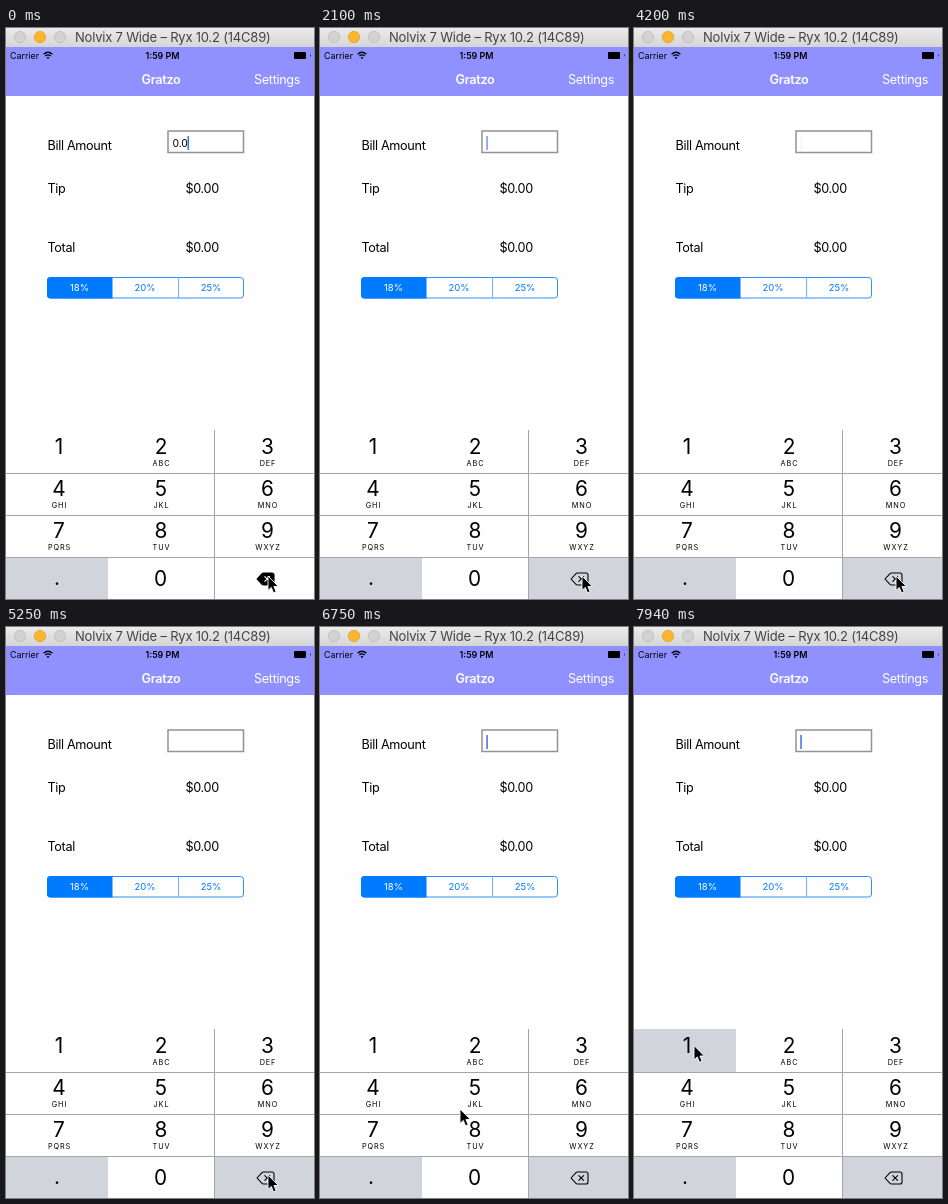
An HTML page for the animation above (8000 ms loop, 308 px wide and 571 px high).

```html
<!DOCTYPE html>
<html lang="en">
<head>
<meta charset="utf-8">
<title>Tip calculator</title>
<style>
  html, body { margin: 0; width: 100%; height: 100%; overflow: hidden; background: #fff; }
  svg { display: block; width: 308px; height: 571px; }
  text { font-family: Inter, Roboto, sans-serif; font-size: 12.65px; letter-spacing: -.32px; fill: #000; }
  .mid { text-anchor: middle; }
  .bar { font-size: 13px; letter-spacing: -.2px; fill: #444; }
  .status { font-size: 8.9px; letter-spacing: 0; }
  .nav { fill: #fff; }
  .bold { font-weight: 600; }
  .field { font-size: 10.4px; letter-spacing: -.1px; }
  .seg { font-size: 9.5px; letter-spacing: -.1px; fill: #007aff; }
  .digit { font-size: 20.8px; letter-spacing: 0; }
  .letters { font-size: 7.3px; letter-spacing: .9px; }
  .line { stroke: #a4a6aa; fill: none; }
  .grey { fill: #d1d5db; }
</style>
</head>
<body>
<svg viewBox="0 0 308 571">
  <defs>
    <linearGradient id="chrome" x2="0" y2="1">
      <stop stop-color="#ebebeb"/><stop offset="1" stop-color="#d5d5d5"/>
    </linearGradient>
  </defs>
  <rect width="308" height="571" fill="#fefefe"/>

  <rect width="308" height="19" fill="url(#chrome)"/>
  <g stroke-width=".7">
    <circle cx="14" cy="9" r="5.7" fill="#d2d2d2" stroke="#b9b9b9"/>
    <circle cx="34" cy="9" r="5.7" fill="#fdb52d" stroke="#dd9d26"/>
    <circle cx="54" cy="9" r="5.7" fill="#d2d2d2" stroke="#b9b9b9"/>
  </g>
  <text class="bar" x="69" y="14">Nolvix 7 Wide – Ryx 10.2 (14C89)</text>

  <rect y="19" width="308" height="49" fill="#9090ff"/>
  <text class="status" x="4" y="31">Carrier</text>
  <g fill="none" stroke="#000" stroke-width="1.3">
    <path d="M37.6 26.2Q42 22.2 46.4 26.2M39.3 28.1Q42 25.7 44.7 28.1"/>
    <path d="M42 31.2L40.6 29.6Q42 28.6 43.4 29.6Z" fill="#000" stroke="none"/>
  </g>
  <text class="status bold mid" x="156.5" y="31">1:59 PM</text>
  <rect x="288" y="24" width="12" height="7" rx="1"/>
  <path d="M304 26q1.6 1.5 0 3z"/>
  <text class="nav bold mid" x="155" y="56">Gratzo</text>
  <text class="nav" x="248" y="56">Settings</text>

  <text x="41.5" y="122">Bill Amount</text>
  <text x="41.5" y="165">Tip</text>
  <text x="41.5" y="224">Total</text>
  <text x="179.5" y="165">$0.00</text>
  <text x="179.5" y="224">$0.00</text>

  <rect x="162" y="103" width="75.5" height="21.5" fill="#fff" stroke="#939393" stroke-width="1.5"/>
  <text class="field" id="amount" x="166.5" y="118.5"></text>
  <rect id="caret" y="108" width="1.5" height="14" fill="#426bf2"/>

  <rect x="41.5" y="249.5" width="196" height="20.5" rx="3" fill="#fff" stroke="#2f8fff"/>
  <path d="M106.5 249H44.5a3.5 3.5 0 0 0-3.5 3.5v14.5a3.5 3.5 0 0 0 3.5 3.5H106.5z" fill="#007aff"/>
  <path d="M172.5 249.5V270" stroke="#6fb3ff"/>
  <text class="seg mid" x="73.5" y="263" style="fill:#fff">18%</text>
  <text class="seg mid" x="139" y="263">20%</text>
  <text class="seg mid" x="205" y="263">25%</text>

  <rect class="grey" id="one" y="402" width="102" height="43"/>
  <rect class="grey" y="529" width="102" height="42"/>
  <rect class="grey" id="del" x="208" y="529" width="100" height="42"/>
  <path class="line" d="M0 445.5H308M0 487.5H308M0 529.5H308M208.5 402V571"/>
  <g id="keys"></g>
  <g stroke-width="1.1" stroke-linejoin="round" stroke-linecap="round">
    <path id="tag" d="M251 551L256 545.6Q256.6 545 257.5 545H266Q268 545 268 547V555Q268 557 266 557H257.5Q256.6 557 256 556.4Z" stroke="#000"/>
    <path id="cross" d="M258.8 548.6l4.8 4.8m0-4.8l-4.8 4.8"/>
  </g>
  <path id="pointer" d="M0 0V14.4L3.3 11.4L5.5 16.8L8.1 15.7L5.9 10.5H10.4Z" stroke="#fff" stroke-width=".9"/>
</svg>
<script>
const LOOP = 8000, STEP = 150;
const $ = id => document.getElementById(id);

const columns = [53, 155, 261.5];
const label = (cls, x, y, s) => `<text class="${cls} mid" x="${x}" y="${y}">${s}</text>`;
const letters = ['', 'ABC', 'DEF', 'GHI', 'JKL', 'MNO', 'PQRS', 'TUV', 'WXYZ'];
$('keys').innerHTML = letters.map((s, i) => {
  const x = columns[i % 3], y = 426 + 42 * Math.floor(i / 3);
  return label('digit', x, y, i + 1) + label('letters', x + .5, y + 11.7, s);
}).join('') + label('digit', 51, 557, '.') + label('digit', 154.5, 558, 0);

// Pointer positions as [time, x, y], each held until the next
const path = [
  [0, 262, 548], [6300, 260, 547], [6450, 243, 538], [6600, 198, 515],
  [6750, 140, 482], [6900, 86, 442], [7050, 59, 421], [7200, 60, 418.5]
];

const clamp = v => Math.max(0, Math.min(1, v));

function blink(t) {
  if (t < 1050) return 1;
  const phase = t % 1000;
  return phase < 400 ? clamp((210 - phase) / 150) : clamp((phase - 520) / 120);
}

function render(t) {
  const tick = Math.floor(t / STEP) * STEP;
  const pressed = t < 600;
  $('amount').textContent = t < 150 ? '0.0' : t < 450 ? '0' : '';
  $('caret').setAttribute('x', t < 150 ? 181.5 : t < 450 ? 173.5 : 166.3);
  $('caret').setAttribute('opacity', blink(tick));
  $('del').style.fill = pressed ? '#fefefe' : '';
  $('tag').setAttribute('fill', pressed ? '#000' : 'none');
  $('cross').setAttribute('stroke', pressed ? '#fff' : '#000');
  $('one').style.visibility = t >= 7940 ? 'visible' : 'hidden';
  const [, x, y] = path.filter(p => p[0] <= t).pop();
  $('pointer').setAttribute('transform', `translate(${x} ${y})`);
}

const start = performance.now();
function frame() {
  render((performance.now() - start) % LOOP);
  requestAnimationFrame(frame);
}
frame();
</script>
</body>
</html>
```
